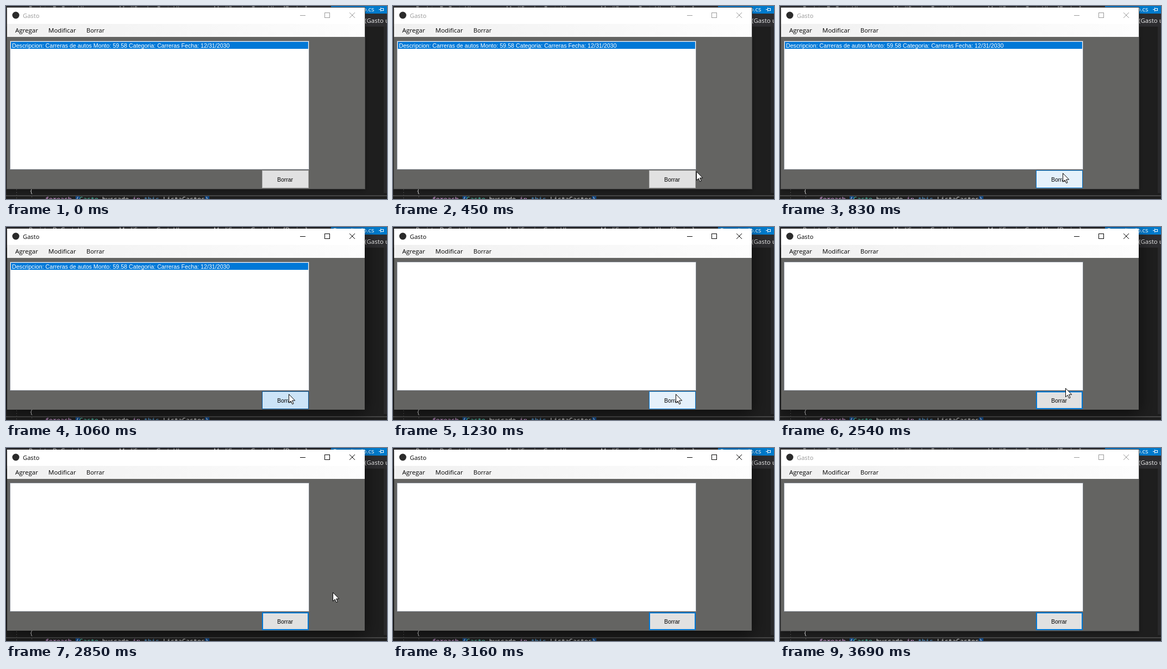
An HTML page with a canvas for the animation above (3860 ms loop, 701 by 356 pixels).

```html
<!DOCTYPE html>
<html lang="es">
<head>
<meta charset="utf-8">
<title>Gasto</title>
<style>
html, body { margin: 0; width: 100%; height: 100%; overflow: hidden; background: #1e1e1e; }
canvas { display: block; }
</style>
</head>
<body>
<canvas id="stage" width="701" height="356"></canvas>
<script>
const ctx = document.getElementById('stage').getContext('2d');
const UI = '"Open Sans", sans-serif';
const FORM = '"Liberation Sans", Arial, sans-serif';
const CODE = '"Noto Sans Mono", monospace';
const BLUE = '#0078d7';

// Times in ms
const LOOP = 3860;
const ENTER = 300, PRESS = 1060, RELEASE = 1230, LEAVE = 2460, BLUR = 3690;
const POINTER_STEP = 76.7;

const button = { x: 471, y: 303, w: 86, h: 33 };

function rect(x, y, w, h, color) {
  ctx.fillStyle = color;
  ctx.fillRect(x, y, w, h);
}

function frame(x, y, w, h, color, line = 1) {
  ctx.strokeStyle = color;
  ctx.lineWidth = line;
  ctx.strokeRect(x + line / 2, y + line / 2, w - line, h - line);
}

function text(str, x, y, size, family, color) {
  ctx.font = size + 'px ' + family;
  ctx.fillStyle = color;
  ctx.fillText(str, x, y);
}

function line(x1, y1, x2, y2, color, width = 1) {
  ctx.strokeStyle = color;
  ctx.lineWidth = width;
  ctx.beginPath();
  ctx.moveTo(x1, y1);
  ctx.lineTo(x2, y2);
  ctx.stroke();
}

function drawPin(x, y) {
  line(x, y, x + 3, y, '#fff');
  line(x + 3.5, y - 3.5, x + 3.5, y + 3.5, '#fff');
  frame(x + 3, y - 2.5, 6, 5, '#fff');
}

function drawCode(x, y) {
  const size = 11.67, advance = size * 0.6;
  const tokens = [
    ['foreach ', '#d8a0df'], ['(', '#dcdcdc'], ['Gasto ', '#4ec9b0'], ['buscado ', '#dcdcdc'],
    ['in ', '#d8a0df'], ['this', '#569cd6'], ['.ListaGastos', '#dcdcdc'], [')', '#dcdcdc']
  ];
  for (const [word, color] of tokens) {
    if (word === '(' || word === ')') rect(x, y - 9, advance + 1, 9, '#0e4583');
    text(word, x, y, size, CODE, color);
    x += word.length * advance;
  }
}

function drawEditor() {
  rect(0, 0, 701, 356, '#1e1e1e');
  rect(0, 0, 701, 38, '#2d2d30');
  rect(598, 0, 103, 14, '#007acc');
  rect(695, 38, 6, 307, '#29292b');

  text('RegistroDeGastoUI.cs', 42, 9, 11.5, UI, '#fff');
  text('ModificacionGastoUI.cs', 208, 9, 11.5, UI, '#fff');
  text('ModificacionGastoUI.cs [Design]', 382, 9, 11.5, UI, '#fff');
  text('Repositorio.cs', 602, 10, 11.5, UI, '#fff');
  text('(Gasto u', 660, 31, 11.5, UI, '#f1f1f1');
  drawPin(686, 6.5);

  ctx.setLineDash([2, 3]);
  line(19.5, 338, 19.5, 356, '#505050');
  line(47.5, 351, 47.5, 356, '#505050');
  ctx.setLineDash([]);
  text('{', 43, 345, 11.67, CODE, '#dcdcdc');
  rect(0, 349, 701, 2, '#464646');
  drawCode(72, 360);
}

function drawWindow(active) {
  ctx.save();
  ctx.shadowColor = active ? 'rgba(0,0,0,.6)' : 'rgba(0,0,0,.3)';
  ctx.shadowBlur = active ? 28 : 10;
  ctx.shadowOffsetY = active ? 6 : 3;
  rect(2, 3, 658, 334, '#646462');
  ctx.restore();
  if (!active) frame(1, 2, 660, 336, '#4b4b4b');

  const ink = active ? '#000' : '#999';
  rect(2, 3, 658, 30, '#fff');
  ctx.fillStyle = '#2b2b2b';
  ctx.beginPath();
  ctx.arc(18, 17, 6.5, 0, Math.PI * 2);
  ctx.fill();
  text('Gasto', 31, 22, 11.2, UI, ink);
  rect(541, 17, 10, 1, ink);
  frame(586, 12, 10, 10, ink);
  line(632, 12, 642, 22, ink);
  line(642, 12, 632, 22, ink);

  const shade = ctx.createLinearGradient(2, 0, 660, 0);
  shade.addColorStop(0, '#f0f0f0');
  shade.addColorStop(1, '#fdfdfd');
  rect(2, 33, 658, 24, shade);
  text('Agregar', 17, 49, 11.5, UI, '#000');
  text('Modificar', 78, 49, 11.5, UI, '#000');
  text('Borrar', 148, 49, 11, UI, '#000');
}

function drawList(filled) {
  rect(7, 64, 551, 238, '#fff');
  frame(7, 64, 551, 238, '#828790');
  if (!filled) return;
  rect(9, 66, 547, 13, BLUE);
  text('Descripcion: Carreras de autos Monto: 59.58 Categoria: Carreras Fecha: 12/31/2030',
    11, 77, 10.67, FORM, '#fff');
}

function drawButton(hover, pressed, focused) {
  const { x, y, w, h } = button;
  rect(x, y, w, h, pressed ? '#cce4f7' : hover ? '#e5f1fb' : '#e1e1e1');
  const edge = pressed ? '#005499' : hover || focused ? BLUE : '#adadad';
  frame(x, y, w, h, edge, focused && !hover ? 2 : 1);
  text('Borrar', x + 28, y + 21, 10.4, FORM, '#000');
}

function bezier(s, p0, p1, p2, p3) {
  const r = 1 - s;
  return r * r * r * p0 + 3 * r * r * s * p1 + 3 * r * s * s * p2 + s * s * s * p3;
}

const mix = (a, b, s) => a + (b - a) * s;

// The pointer advances in discrete steps: it glides in and slows, then arcs away.
function pointerAt(t) {
  const stepsSince = start => Math.floor((t - start + 5) / POINTER_STEP);
  const away = stepsSince(LEAVE);
  if (t < ENTER || away > 8) return null;
  if (away >= 0) {
    const s = Math.pow(away / 8, 1.85);
    return { x: Math.round(bezier(s, 521, 575, 675, 651)), y: Math.round(bezier(s, 306, 158, 375, 331)) };
  }
  const s = 1 - Math.pow(1 - Math.min(stepsSince(ENTER) / 6, 1), 2.25);
  return {
    x: Math.round(mix(614, 520, s)),
    y: Math.round(mix(mix(332, 294, s), mix(294, 308, s), s))
  };
}

function drawPointer({ x, y }) {
  ctx.save();
  ctx.translate(x, y);
  const arrow = new Path2D('M.5 .5V16.5L4.2 13.1L6.8 18.8L9.1 17.8L6.6 12.1H11.7Z');
  ctx.fillStyle = '#fff';
  ctx.fill(arrow);
  ctx.strokeStyle = '#000';
  ctx.lineWidth = 1;
  ctx.stroke(arrow);
  ctx.restore();
}

function isOver(p, box) {
  return p !== null && p.x >= box.x && p.x < box.x + box.w && p.y >= box.y && p.y < box.y + box.h;
}

function draw(t) {
  const pointer = pointerAt(t);
  drawEditor();
  drawWindow(t >= PRESS && t < BLUR);
  drawList(t < RELEASE);
  drawButton(isOver(pointer, button), t >= PRESS && t < RELEASE, t >= PRESS);
  if (pointer) drawPointer(pointer);
}

const start = performance.now();
function tick() {
  draw((performance.now() - start) % LOOP);
  requestAnimationFrame(tick);
}
tick();
</script>
</body>
</html>
```
